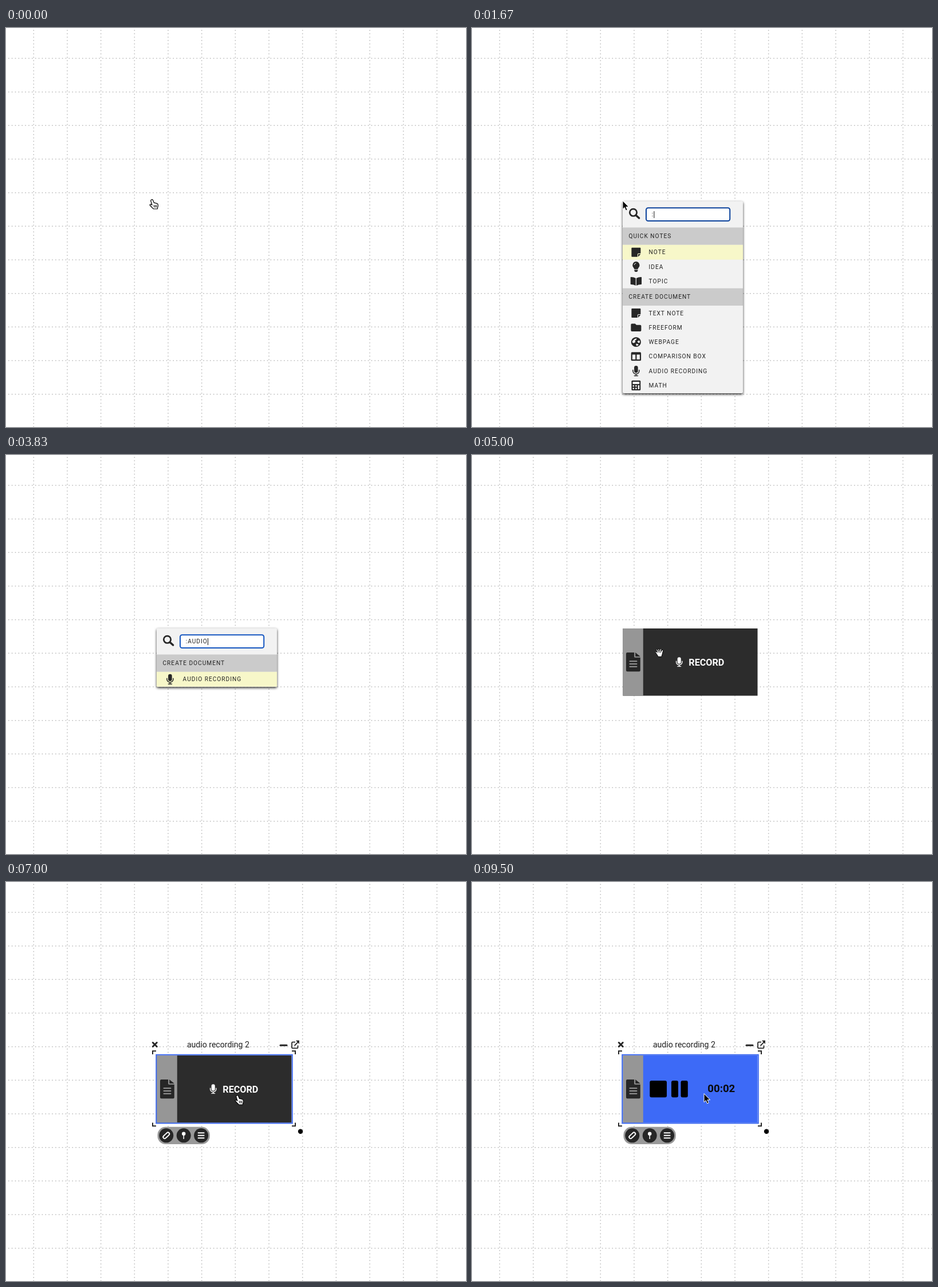
Recreate the animation shown at these times as an HTML page. Size 803 by 697 pixels, loop 9910 ms.

```html
<!DOCTYPE html>
<html lang="en">
<head>
<meta charset="utf-8">
<title>Audio recording demo</title>
<style>
  html, body { margin: 0; width: 100%; height: 100%; overflow: hidden; background: #fff; }
  svg { display: block; position: absolute; left: 0; top: 0; }
  text { font-family: Roboto, Arial, sans-serif; fill: #222; }
  .label { font-size: 10.2px; letter-spacing: .98px; }
  .bold { font-weight: 700; }
  .panel { fill: #f2f2f2; filter: drop-shadow(0 2px 2px rgba(0, 0, 0, .8)); }
  .head { fill: #cbcbcb; }
  .active { fill: #f7f7c9; }
  .ink { fill: #262626; }
  .line { fill: none; stroke: #262626; stroke-width: 2; }
  .cursor { stroke-linejoin: round; stroke-linecap: round; }
</style>
</head>
<body>
<svg id="stage" width="803" height="697" viewBox="0 0 803 697">
  <defs>
    <g id="note" class="ink"><path d="M-8-7Q-8-8-7-8H7Q8-8 8-7V2H4Q2.500 2 2.500 3.500V8H-7Q-8 8-8 7ZM3.600 3.200H8L3.600 8Z"/></g>
    <g id="idea">
      <path class="ink" d="M0-9A6.300 6.300 0 0 1 4.700 1.200Q3.300 3 3 4.400H-3Q-3.300 3-4.700 1.200A6.300 6.300 0 0 1 0-9ZM-3 5.400H3V7.400L1.500 9H-1.500L-3 7.400Z"/>
      <path d="M-3.200-3Q-3-5.800 0-6.200" fill="none" stroke="#f2f2f2"/>
    </g>
    <g id="topic" class="ink">
      <path id="page" d="M-.6-5.200Q-4-7.300-8.800-7.400Q-9.700-7.400-9.700-6.500V4.800Q-9.700 5.700-8.800 5.800Q-4 6-.6 7.800Z"/>
      <use href="#page" transform="scale(-1 1)"/>
    </g>
    <g id="folder" class="ink"><path d="M-7.300-6.700H-1.700L.6-4.500H7.300Q9-4.500 9-2.800V5Q9 6.700 7.300 6.700H-7.300Q-9 6.700-9 5V-5Q-9-6.700-7.300-6.700Z"/></g>
    <g id="globe">
      <circle class="ink" r="8.600"/>
      <path fill="#f2f2f2" d="M-6.500-1.500L-3-5L1-6.500L.5-4L-2-2.500L-1 0L-4 2L-6.500 1ZM2-1L5.500-3L7 0L5 2L3.500 1ZM0 3L3 3.500L4.500 5L1.500 7L0 5.500Z"/>
    </g>
    <g id="columns"><path class="ink" fill-rule="evenodd" d="M-7-7.500H7Q8.700-7.500 8.700-5.900V5.900Q8.700 7.500 7 7.500H-7Q-8.700 7.500-8.700 5.900V-5.900Q-8.700-7.500-7-7.500ZM-6.500-3.200V5.300H-1.100V-3.200ZM1.100-3.200V5.300H6.500V-3.200Z"/></g>
    <g id="mic">
      <rect x="-3.300" y="-9" width="6.600" height="12.300" rx="3.300"/>
      <path d="M-5.500-1.500V0A5.500 5.500 0 0 0 5.500 0V-1.500M0 5.500V8.200M-3 8.300H3" fill="none" stroke="currentColor" stroke-width="1.500" stroke-linecap="round"/>
    </g>
    <g id="calc">
      <rect class="ink" x="-7.900" y="-8.700" width="15.800" height="17.400" rx="1.600"/>
      <path fill="#f2f2f2" d="M-5.800-6.500H5.800V-2.500H-5.800ZM-5.800-.3H-3.300V2.200H-5.800ZM-1.300-.3H1.300V2.200H-1.300ZM-5.800 4.200H-3.300V6.700H-5.800ZM-1.300 4.200H1.300V6.700H-1.300ZM3.300-.3H5.800V6.700H3.300Z"/>
    </g>
  </defs>

  <path id="grid" fill="none" stroke="#000" stroke-opacity=".29" stroke-width="1.500" stroke-dasharray="1.500 4.367"/>
  <path id="noteCaret" d="M264.500 303V321" stroke="#777"/>

  <g id="fullMenu"></g>
  <g id="shortMenu"></g>
  <g id="search">
    <circle class="line" cx="281.500" cy="322.300" r="6.200" style="stroke-width:2.700"/>
    <path class="line" d="M286.300 327.200L291.600 332" style="stroke-width:3.500;stroke-linecap:round"/>
    <rect id="field" x="304" y="314.300" width="146.200" height="22.800" rx="3.500" fill="#fff" stroke-width="2"/>
    <text id="query" class="label" x="313.700" y="329.200"></text>
    <path id="caret" d="M0 320V332" stroke="#111"/>
  </g>

  <g id="card">
    <rect id="back" x="263.500" y="303" width="235" height="117.500" fill="#2c2c2c"/>
    <rect id="side" x="263.500" y="303" width="35.300" height="117.500" fill="#969696"/>
    <path class="ink" d="M271.200 345H283.200V352.200Q283.200 353.800 284.800 353.800H293.800V376.300Q293.800 378.300 291.800 378.300H271.200Q269 378.300 269 376.300V347Q269 345 271.200 345ZM285.200 345L293.800 352H285.200Z"/>
    <path d="M275.500 360.300H287.500M275.500 365H287.500M275.500 369.700H287.500" stroke="#969696" stroke-width="2" stroke-linecap="round"/>
    <g id="idle">
      <use href="#mic" transform="translate(361.700 361.700) scale(.93)" fill="#fff" color="#fff"/>
      <text class="bold" x="378.300" y="367.600" style="font-size:16.200px;fill:#fff">RECORD</text>
    </g>
    <g id="active">
      <rect x="310.300" y="347" width="29.700" height="29.200" rx="3"/>
      <rect x="348" y="347" width="12" height="29.200" rx="3"/>
      <rect x="364.500" y="347" width="12.300" height="29.200" rx="3"/>
      <text id="clock" class="bold" x="411.300" y="367.300" style="font-size:18.600px;fill:#0a0a0a"></text>
    </g>
    <rect id="outline" x="262.300" y="301.800" width="237.400" height="119.600" fill="none" stroke="#3d69ef" stroke-width="2"/>
  </g>

  <g id="tools">
    <path class="line" d="M256.300 280.500L263.300 287.500M263.300 280.500L256.300 287.500" style="stroke-width:2.900;stroke-linecap:round"/>
    <text x="315.900" y="288.700" style="font-size:14.100px">audio recording 2</text>
    <path class="line" d="M479 285.300H490" style="stroke-width:3;stroke-linecap:round"/>
    <path class="line" d="M505 279.700H500.500Q499 279.700 499 281.200V289Q499 290.300 500.300 290.300H508.200Q509.500 290.300 509.500 289V285.500M503.500 286L510.500 278.800" style="stroke-width:1.800"/>
    <path class="ink" d="M505.800 276.800H511.900V283Z"/>
    <path class="line" d="M256 301V295.300H262M499 295.300H505V301M505 420.500V426.200H499M262 426.200H256V420.500"/>
    <rect x="264.500" y="427.800" width="91.300" height="30.200" rx="14" fill="#999"/>
    <circle class="ink" cx="279.800" cy="442.800" r="12.500"/>
    <circle class="ink" cx="310.200" cy="442.800" r="12.500"/>
    <circle class="ink" cx="340.600" cy="442.800" r="12.500"/>
    <g transform="translate(279.800 442.800) rotate(-45)" fill="none" stroke="#fff" stroke-width="1.900">
      <path d="M1.500-2.700H-4A2.600 2.600 0 0 0-4 2.500H-1M-1.500 2.700H4A2.600 2.600 0 0 0 4-2.500H1"/>
    </g>
    <circle cx="310.200" cy="439.700" r="3.200" fill="#fff"/>
    <path d="M310.200 442V449" stroke="#fff" stroke-width="1.500"/>
    <path d="M334.800 438.300H346.400M334.800 442.800H346.400M334.800 447.300H346.400" stroke="#fff" stroke-width="2"/>
    <circle cx="514" cy="435.800" r="4.200"/>
  </g>

  <g id="pointer" class="cursor">
    <path fill="#fff" stroke="#000" stroke-width="1.200" d="M4 1.900Q5.600 1 6.500 2.800L8.500 7.600Q9.700 6.900 10.700 8Q12 7.300 12.900 8.600Q14.500 8.200 15 9.700Q16 13 14.700 15.200L14.300 18H7.500Q4.200 15 1.200 11.500Q1 9.700 3 10L5 11.200L2.800 4.300Q2.500 2.600 4 1.900Z"/>
    <path fill="none" stroke="#000" d="M8.200 11.500L8.700 15M10.500 11.500L10.800 15M12.700 11.500V15"/>
  </g>
  <g id="palm" class="cursor">
    <path fill="#fff" stroke="#000" stroke-width="1" d="M-2 7L-6.700-.3Q-6.700-2-5-1.600L-3.600 0L-5.200-4.500Q-4.300-6.600-3-5L-1.900-2.300L-2.100-6.200Q-1-7.600 0-6.200L.5-2.300L1.500-6.200Q3-7.200 3.600-5.600L3-1.800L4.900-4.500Q6.700-5.200 6.600-3.300L5.200 3Q4.200 5 4 7Z"/>
    <path fill="none" stroke="#000" stroke-width=".7" d="M-1.900-2.300L-1.300 0M.5-2.300V0M3-1.800L2.200 .5"/>
  </g>
  <g id="arrow" class="cursor">
    <path fill="#000" stroke="#fff" stroke-width="1" d="M0 0V14.600L3.300 11.500L5.600 16.900L8.200 15.800L5.900 10.600H10.300Z"/>
  </g>
</svg>
<script>
const LOOP = 9910, CELL = 58.67;
const el = {};
document.querySelectorAll('[id]').forEach(n => el[n.id] = n);

let lines = '';
for (let x = 48.3; x < 803; x += CELL) lines += `M${x} 3.500V697`;
for (let y = 53; y < 697; y += CELL) lines += `M4 ${y}H803`;
el.grid.setAttribute('d', lines);

// Rows are [label, icon]; a row without an icon is a section header.
function buildMenu(group, rows, bottom) {
  let y = 348.500, first = true;
  let out = `<rect class="panel" x="263" y="302.500" width="210" height="${bottom - 302.5}" rx="2.500"/>`;
  for (const [name, icon] of rows) {
    const h = icon ? 25.3 : 30.3, mid = y + (icon ? 12.9 : 14.8);
    if (!icon) out += `<rect class="head" x="263" y="${y}" width="210" height="${h}"/>`;
    else {
      if (first) out += `<rect class="active" x="263" y="${y}" width="210" height="25.800"/>`;
      out += `<use href="#${icon}" class="ink" color="#262626" transform="translate(286.400 ${mid})"/>`;
      first = false;
    }
    out += `<text class="label" x="${icon ? 308.6 : 273.5}" y="${mid + 3.6}">${name}</text>`;
    y += h;
  }
  group.innerHTML = out;
}
buildMenu(el.fullMenu, [
  ['QUICK NOTES'], ['NOTE', 'note'], ['IDEA', 'idea'], ['TOPIC', 'topic'],
  ['CREATE DOCUMENT'], ['TEXT NOTE', 'note'], ['FREEFORM', 'folder'], ['WEBPAGE', 'globe'],
  ['COMPARISON BOX', 'columns'], ['AUDIO RECORDING', 'mic'], ['MATH', 'calc']
], 638);
buildMenu(el.shortMenu, [['CREATE DOCUMENT'], ['AUDIO RECORDING', 'mic']], 405);

// [start, text, caret x]
const typing = [
  [0, ':', 317.9], [2170, ':A', 325.2], [2500, ':AU', 333],
  [2670, ':AUD', 340.7], [2830, ':AUDIO', 352.5]
];
// [start, kind, x, y]
const mouse = [
  [0, 'pointer', 250, 298], [80, 'pointer', 255, 300], [170, 'arrow', 263, 302], [1750, ''],
  [5000, 'palm', 327, 345], [5080, 'palm', 343, 362], [5170, 'palm', 366, 388],
  [5250, 'palm', 388, 412], [5330, 'pointer', 396, 424], [5420, 'pointer', 399, 423],
  [5500, 'palm', 407, 408], [5580, 'palm', 406, 390], [5670, 'palm', 405, 377],
  [5750, 'palm', 405, 371], [7000, 'pointer', 399, 371], [7920, 'arrow', 405, 370]
];
const clock = [[0, '00:00'], [8420, '00:01'], [9500, '00:02']];

const at = (steps, t) => steps.findLast(s => s[0] <= t);
const show = (node, on) => node.style.display = on ? '' : 'none';
const box = (node, x, y, w, h) =>
  Object.entries({ x, y, width: w, height: h }).forEach(([k, v]) => node.setAttribute(k, v));

function draw(t) {
  const within = (a, b = LOOP) => t >= a && t < b;
  const recording = within(7920);

  show(el.noteCaret, within(670, 1670));
  show(el.fullMenu, within(1670, 2170));
  show(el.shortMenu, within(2170, 3920));
  show(el.search, within(1670, 3920));
  el.field.setAttribute('stroke', t < 1750 ? '#0b429c' : '#1556c0');
  const [, text, caretX] = at(typing, t);
  el.query.textContent = text;
  el.caret.setAttribute('transform', `translate(${caretX})`);
  show(el.caret, !within(3330, 3830));

  show(el.card, within(3920));
  show(el.outline, within(5080));
  show(el.tools, within(7000));
  show(el.idle, !recording);
  show(el.active, recording);
  el.back.setAttribute('fill', recording ? '#3d6af7' : '#2c2c2c');
  el.clock.textContent = at(clock, t)[1];

  const [, kind, x, y] = at(mouse, t);
  for (const name of ['pointer', 'palm', 'arrow']) {
    show(el[name], name === kind);
    if (name === kind) el[name].setAttribute('transform', `translate(${x} ${y})`);
  }
}

box(el.back, 263.5, 303, 235, 117.5);
const start = performance.now();
function frame() {
  draw((performance.now() - start) % LOOP);
  requestAnimationFrame(frame);
}
draw(0);
requestAnimationFrame(frame);
</script>
</body>
</html>
```
